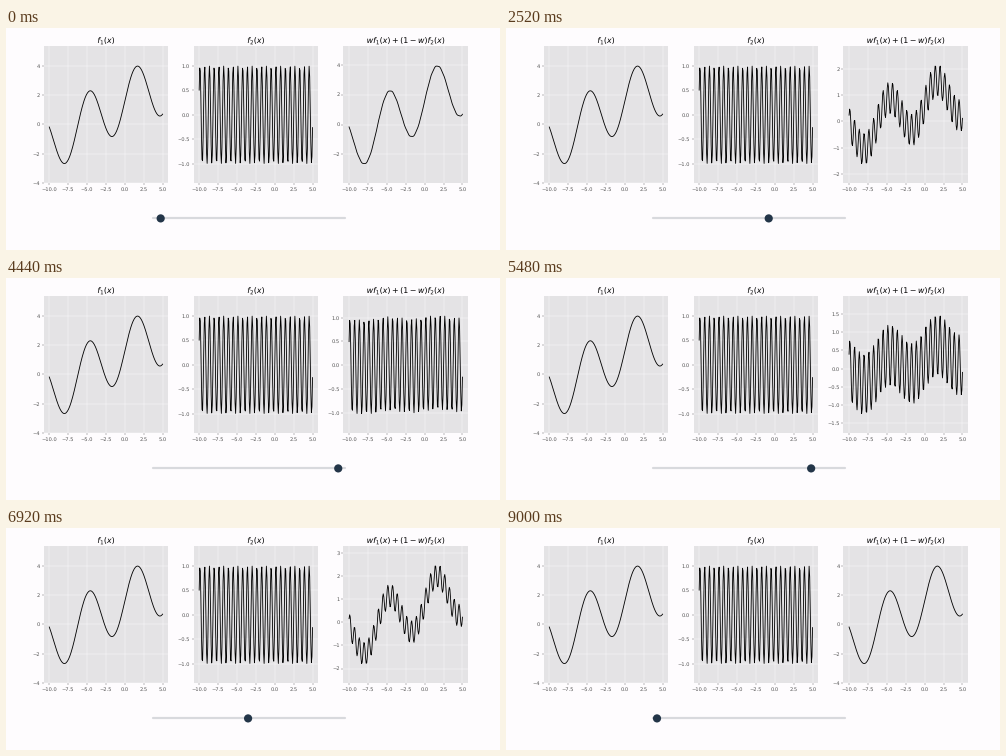
Recreate the animation shown at these times as a matplotlib script. Size 494 by 222 pixels, loop 9.04 s.

```python
import matplotlib.pyplot as plt
import numpy as np
from matplotlib.animation import FuncAnimation
from matplotlib.patches import Circle, PathPatch
from matplotlib.textpath import TextPath
from matplotlib.transforms import Affine2D

W, H = 494, 222
PX = 0.72  # points per pixel at 100 dpi
STEP, LOOP = 40, 9040
TOP, BOTTOM, WIDTH = 18.2, 155.4, 124.7
SLIDER_Y = 190.4
PAPER, PANEL, TICK = "#fefcfe", "#e4e3e5", "#555555"
TRACK, KNOB = "#d8d9dd", "#233548"

plt.rcParams.update({
    "font.family": "DejaVu Sans",
    "font.size": 5.1 * PX,
    "text.hinting": "none",
    "axes.facecolor": PANEL,
    "axes.axisbelow": True,
    "axes.grid": True,
    "grid.color": "#fcfbfd",
    "grid.linewidth": 0.45 * PX,
    "lines.linewidth": 0.85 * PX,
})
for axis in ("xtick", "ytick"):
    plt.rcParams.update({
        f"{axis}.color": TICK,
        f"{axis}.major.size": 1.8 * PX,
        f"{axis}.major.width": 0.4 * PX,
        f"{axis}.major.pad": 1.8 * PX,
    })

x = np.linspace(-10, 5, 200)
f1 = 2 * np.sin(x) + 3 * np.sin(0.1 * x + 0.565)
f2 = np.sin(10 * x)


def weight(t):
    """Steady drag to the right, a short rest, steady drag back."""
    if t < 4960:
        slide = 0.98 - 0.000233 * t
        return max(slide, 0.04 if t < 4440 else 0.015)
    return 1 - 0.000238 * (9000 - t)


def knob_x(w):
    return 335 - 184 * w


def fit_y(ax, y):
    pad = 0.204 * np.ptp(y)
    ax.set_ylim(y.min() - pad, y.max() + pad)


def title(text, center):
    path = TextPath((0, 0), text, size=7.9)
    box = path.get_extents()
    place = Affine2D().scale(1, -1).translate(center - (box.x0 + box.x1) / 2, 15)
    stage.add_patch(PathPatch(path, fc="black", ec="none",
                              transform=place + stage.transData))


def panel(left, text, y):
    ax = fig.add_axes([left / W, 1 - BOTTOM / H, WIDTH / W, (BOTTOM - TOP) / H])
    for spine in ax.spines.values():
        spine.set_visible(False)
    title(text, left + WIDTH / 2)
    ax.set_xlim(-10.75, 5.75)
    fit_y(ax, y)
    line, = ax.plot(x, y, color="black")
    return ax, line


fig = plt.figure(figsize=(W / 100, H / 100), dpi=100, facecolor=PAPER)

stage = fig.add_axes([0, 0, 1, 1])
stage.set(xlim=(0, W), ylim=(H, 0))
stage.axis("off")
stage.plot([147, 339], [SLIDER_Y, SLIDER_Y], color=TRACK, lw=2.2 * PX,
           solid_capstyle="round")
knob = stage.add_patch(Circle((knob_x(1), SLIDER_Y), 4.1, fc=KNOB, ec="none", zorder=3))

panel(37.6, "$f_1(x)$", f1)
panel(187.5, "$f_2(x)$", f2)
mix_ax, mix_line = panel(337.4, "$w f_1(x) + (1-w) f_2(x)$", f1)


def draw(i):
    w = weight(i * STEP)
    y = w * f1 + (1 - w) * f2
    mix_line.set_ydata(y)
    fit_y(mix_ax, y)
    knob.center = knob_x(w), SLIDER_Y
    return mix_line, knob


anim = FuncAnimation(fig, draw, frames=LOOP // STEP, interval=STEP,
                     repeat=True, repeat_delay=0, blit=False)
plt.show()
```
